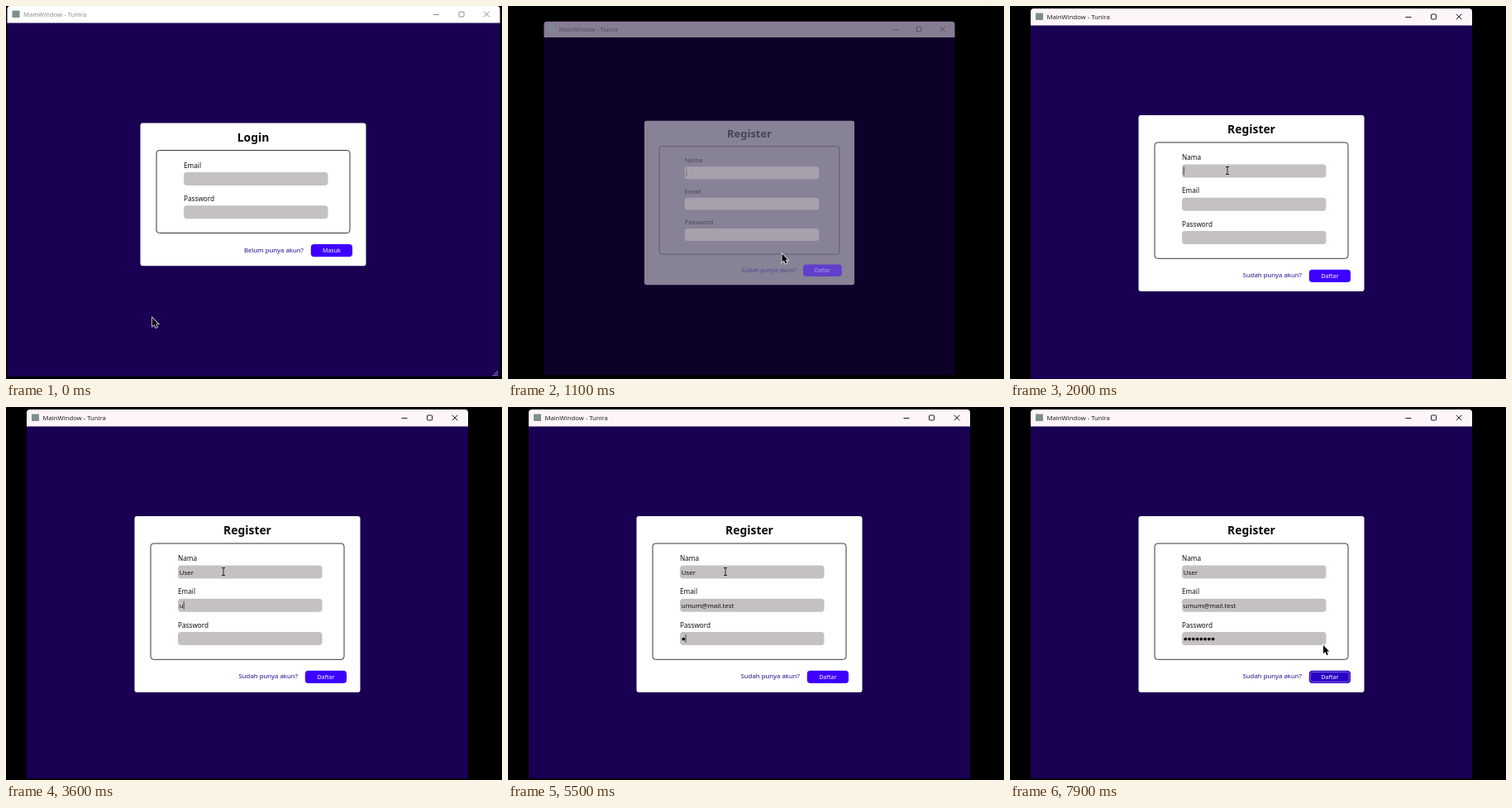
An HTML page with a canvas for the animation above (8 s loop, 600 px wide and 451 px high).

```html
<!DOCTYPE html>
<html lang="id">
<head>
<meta charset="utf-8">
<title>Login and register</title>
<style>
html, body { margin: 0; width: 100%; height: 100%; overflow: hidden; background: #000; }
canvas { display: block; }
</style>
</head>
<body>
<canvas id="stage" width="600" height="451"></canvas>
<script>
const ctx = document.getElementById('stage').getContext('2d');
const LOOP = 8000, SWITCH = 1100;
const FONT = '"Noto Sans", "Open Sans", sans-serif';
const NAVY = '#1a0052';

const clamp = (v, lo = 0, hi = 1) => Math.min(hi, Math.max(lo, v));
const smooth = p => p * p * (3 - 2 * p);

function box(x, y, w, h, r, fill, stroke) {
  ctx.beginPath();
  ctx.roundRect(x, y, w, h, r);
  if (fill) { ctx.fillStyle = fill; ctx.fill(); }
  if (stroke) { ctx.strokeStyle = stroke; ctx.lineWidth = 1; ctx.stroke(); }
}

function text(str, x, y, size, color = '#111', align = 'left', weight = 400) {
  ctx.font = `${weight} ${size}px ${FONT}`;
  ctx.textAlign = align;
  ctx.fillStyle = color;
  ctx.fillText(str, x, y);
}

function line(color, width, ...strokes) {
  ctx.strokeStyle = color;
  ctx.lineWidth = width;
  ctx.beginPath();
  for (const [x1, y1, x2, y2] of strokes) {
    ctx.moveTo(x1, y1);
    ctx.lineTo(x2, y2);
  }
  ctx.stroke();
}

function appWindow(x, y, right, bottom, bar, ink) {
  box(x, y, right - x, bottom - y, [4, 4, 0, 0], NAVY);
  box(x, y, right - x, 20.5, [4, 4, 0, 0], bar);
  box(x + 6, y + 5.5, 9, 8.5, 0, '#7d908d');
  text('MainWindow - Tunira', x + 19.5, y + 13.3, 7.7, ink);
  const cy = y + 10, min = right - 77, max = right - 46.5, close = right - 16;
  line(ink, 1, [min - 3.5, cy + .5, min + 3.5, cy + .5],
    [close - 3.3, cy - 3.3, close + 3.3, cy + 3.3],
    [close - 3.3, cy + 3.3, close + 3.3, cy - 3.3]);
  box(max - 3, cy - 3, 6, 6, 1, null, ink);
}

function form(x, y, title, labels, link, action, focused) {
  const extra = 40.3 * (labels.length - 2);
  box(x, y, 273, 172.8 + extra, 3, '#fff');
  text(title, x + 136.5, y + 22, 13.9, '#0a0a0a', 'center', 700);
  box(x + 19.5, y + 33, 234, 100 + extra, 3.5, null, '#38343c');
  labels.forEach((label, i) => {
    const top = y + 59.5 + 40.2 * i;
    text(label, x + 52.5, top - 5.3, 8.2);
    box(x + 52.5, top, 174.5, 16, 4, '#c5c1c3');
  });
  const by = y + 146.4 + extra;
  text(link, x + 197.5, by + 9.6, 7.8, '#20108e', 'right');
  box(x + 206.3, by, 50.2, 15.4, 4, focused ? '#2900c4' : '#3d00ff');
  if (focused) {
    ctx.setLineDash([1, 1]);
    box(x + 208, by + 1.7, 46.8, 12, 3, null, '#d8ccff');
    ctx.setLineDash([]);
  }
  text(action, x + 231.4, by + 10.4, 7, '#fff', 'center');
}

function login() {
  appWindow(1.5, 0, 597.5, 448, '#fff', '#8c8c8c');
  form(162.5, 141.5, 'Login', ['Email', 'Password'], 'Belum punya akun?', 'Masuk');
  ctx.fillStyle = '#c8c4d4';
  for (let i = 0; i < 3; i++)
    for (let j = 0; j <= i; j++) ctx.fillRect(593.5 - 2.3 * j, 441.5 + 2.2 * i, 1.2, 1.2);
}

// Typed values: first key, time per key, and when the field takes focus
const entries = [
  { value: 'User', start: 2450, step: 200, focus: SWITCH },
  { value: 'umum@mail.test', start: 3550, step: 120, focus: 3350 },
  { value: '●●●●●●●●', start: 5450, step: 200, focus: 5300, secret: true }
];
const FOCUS_BUTTON = 7300;

function typing(t) {
  entries.forEach((e, i) => {
    const top = 191.5 + 40.2 * i;
    const count = clamp(Math.floor((t - e.start) / e.step) + 1, 0, e.value.length);
    let end;
    if (e.secret) {
      ctx.fillStyle = '#111';
      for (let k = 0; k < count; k++) {
        ctx.beginPath();
        ctx.arc(212.3 + 4.75 * k, top + 8.7, 1.9, 0, 7);
        ctx.fill();
      }
      end = 210.2 + 4.75 * count;
    } else {
      const typed = e.value.slice(0, count);
      text(typed, 209.8, top + 11.3, 7.9);
      end = 210.3 + ctx.measureText(typed).width;
    }
    const next = entries[i + 1] ? entries[i + 1].focus : FOCUS_BUTTON;
    const origin = Math.max(e.focus, Math.min(t, e.start + e.step * (count - 1)));
    if (t >= e.focus && t < next && (t - origin) % 1060 < 530)
      line('#222', .8, [end, top + 3, end, top + 13]);
  });
}

function register(t) {
  const p = clamp((t - SWITCH) / 200);
  const scale = 1 - .07 * (1 - p) ** 2;
  ctx.save();
  ctx.globalAlpha = clamp(.5 + 2 * p);
  ctx.translate(292, 231);
  ctx.scale(scale, scale);
  ctx.translate(-292, -231);
  appWindow(25, 3, 559, 462, '#fdf5fa', '#222');
  form(155.5, 132, 'Register', ['Nama', 'Email', 'Password'], 'Sudah punya akun?', 'Daftar', t >= FOCUS_BUTTON);
  typing(t);
  ctx.restore();
  if (t >= 2500) {
    ctx.fillStyle = '#000';
    ctx.fillRect(0, 449, 600, 2);
  }
}

// Pointer stops: time, x, y
const stops = [[150, 177, 377], [900, 332, 301], [1050, 332, 301], [1150, 331, 298],
  [1250, 331, 298], [1800, 263, 199], [7450, 263, 199], [7900, 379, 288]];

function pointerAt(t) {
  const i = stops.findIndex(s => s[0] > t);
  if (i === 0) return stops[0].slice(1);
  if (i < 0) return stops[stops.length - 1].slice(1);
  const [t0, x0, y0] = stops[i - 1], [t1, x1, y1] = stops[i];
  const p = smooth((t - t0) / (t1 - t0));
  return [x0 + (x1 - x0) * p, y0 + (y1 - y0) * p];
}

function pointer(t) {
  const [x, y] = pointerAt(t);
  const overField = t >= SWITCH && x > 208 && x < 382.5 &&
    entries.some((_, i) => Math.abs(y - 199.5 - 40.2 * i) < 8);
  ctx.save();
  ctx.translate(x, y);
  if (overField) {
    line('#222', 1, [0, -4, 0, 4], [-2, -4.5, 2, -4.5], [-2, 4.5, 2, 4.5]);
  } else {
    const tip = new Path2D('M0 0V10.2L2.4 8 4.1 12 5.9 11.2 4.2 7.4H7.2Z');
    ctx.strokeStyle = '#fff';
    ctx.lineWidth = 1.4;
    ctx.stroke(tip);
    ctx.fillStyle = '#000';
    ctx.fill(tip);
  }
  ctx.restore();
}

function draw(now) {
  const t = now % LOOP;
  ctx.fillStyle = '#000';
  ctx.fillRect(0, 0, 600, 451);
  if (t < SWITCH) login();
  else register(t);
  pointer(t);
}

const begin = performance.now();
function tick() {
  draw(performance.now() - begin);
  requestAnimationFrame(tick);
}
tick();
</script>
</body>
</html>
```
